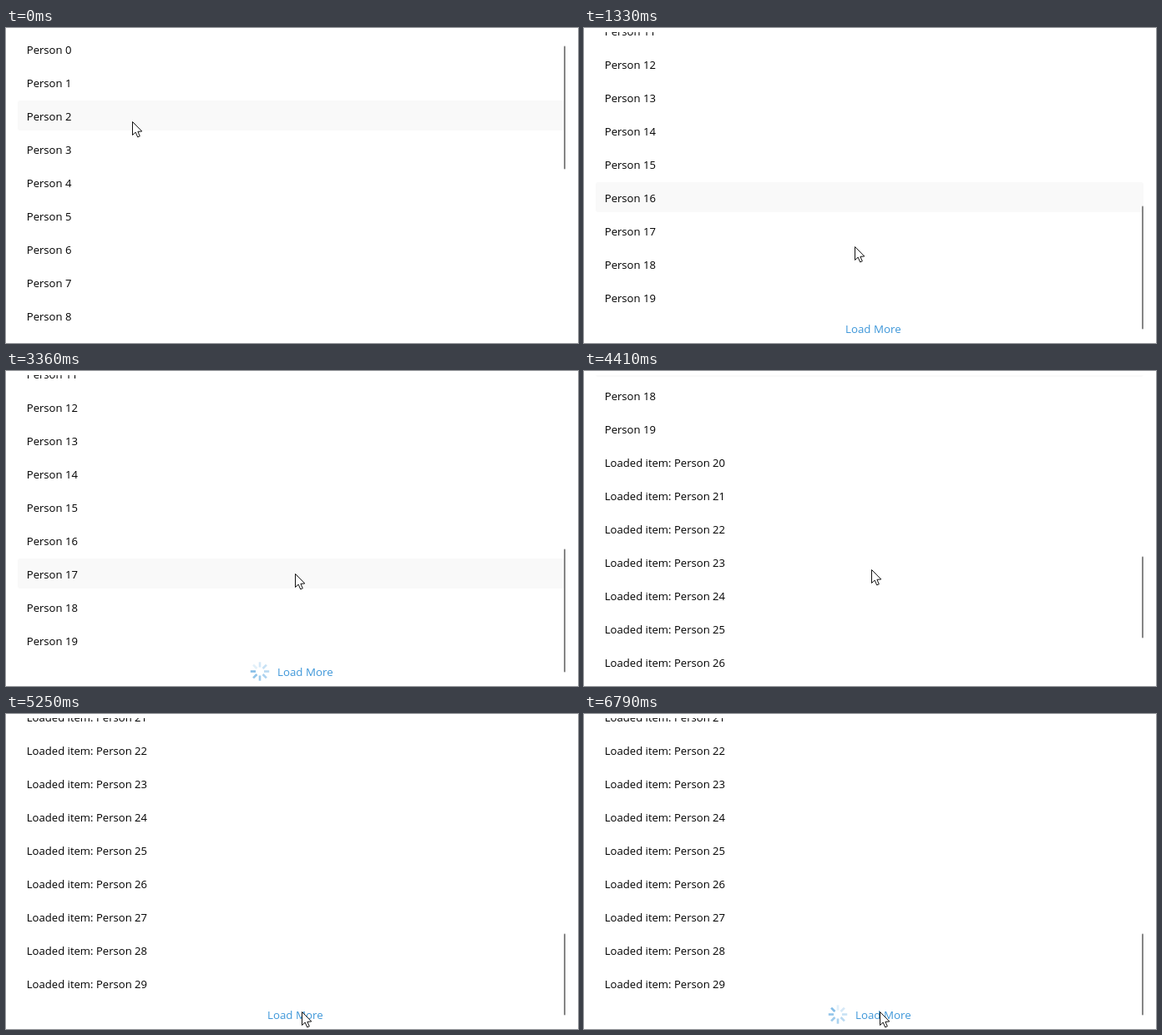
Recreate the animation shown at these times as an HTML page with a canvas. Size 685 px wide and 378 px high, loop 6860 ms.

```html
<!DOCTYPE html>
<html lang="en">
<head>
<meta charset="utf-8">
<title>Load More list</title>
<style>
html, body { margin: 0; width: 100%; height: 100%; overflow: hidden; background: #fff; }
canvas { display: block; }
</style>
</head>
<body>
<canvas id="stage" width="685" height="378"></canvas>
<script>
const ctx = document.getElementById('stage').getContext('2d');
const LOOP = 6860, TICK = 70, ROW = 40, SPIN = 93;
const LOADED = 3920, FIRST_CLICK = 2170, SECOND_CLICK = 5460;
const ACCENT = '#3e97d9';
const FONT = '"Open Sans", "Noto Sans", sans-serif';

const pointerStart = { x: 151, y: 112 };
const pointerMoves = [
  { from: 0, to: 140, x: 149, y: 117 },
  { from: 1120, to: 1330, x: 324, y: 262 },
  { from: 1330, to: 1820, x: 336, y: 359 },
  { from: 2660, to: 3360, x: 346, y: 243 },
  { from: 3360, to: 3500, x: 344, y: 238 },
  { from: 4830, to: 5250, x: 354, y: 357 }
];

const progress = (t, from, to) => Math.max(0, Math.min(1, (t - from) / (to - from)));
const easeOut = (u, power) => 1 - (1 - u) ** power;
const smooth = u => u * u * (3 - 2 * u);

const countAt = t => t < LOADED ? 20 : 30;

function scrollAt(t) {
  return Math.round(462 * easeOut(progress(t, 420, 1050), 2.34)
    + 400 * easeOut(progress(t, 4270, 4760), 3));
}

function pointerAt(t) {
  let { x, y } = pointerStart;
  for (const m of pointerMoves) {
    const u = smooth(progress(t, m.from, m.to));
    x += (m.x - x) * u;
    y += (m.y - y) * u;
  }
  return { x: Math.round(x), y: Math.round(y) };
}

// The highlight trails the pointer, and trails longer while the list scrolls.
function hoverAt(t) {
  const scrolling = scrollAt(t) !== scrollAt(t - TICK);
  const past = t - (scrolling ? 315 : TICK);
  const row = Math.floor((pointerAt(past).y + scrollAt(past) - 7) / ROW);
  return row < countAt(past) ? row : -1;
}

function text(str, x, y, color, size) {
  ctx.font = size + 'px ' + FONT;
  ctx.fillStyle = color;
  ctx.fillText(str, x, y);
}

function pill(x, y, w, h, r, color) {
  ctx.fillStyle = color;
  ctx.beginPath();
  ctx.roundRect(x, y, w, h, r);
  ctx.fill();
}

function drawSpinner(x, y, elapsed) {
  const head = Math.floor(elapsed / SPIN + 0.4) + 1;
  ctx.save();
  ctx.translate(x, y);
  ctx.lineWidth = 2.6;
  ctx.strokeStyle = ACCENT;
  ctx.rotate(head * Math.PI / 4);
  for (let age = 0; age < 8; age++) {
    ctx.globalAlpha = 0.64 - age * 0.07;
    ctx.beginPath();
    ctx.moveTo(0, -5);
    ctx.lineTo(0, -11.2);
    ctx.stroke();
    ctx.rotate(-Math.PI / 4);
  }
  ctx.restore();
}

function drawPointer({ x, y }) {
  ctx.save();
  ctx.translate(x + 0.5, y + 0.5);
  ctx.beginPath();
  [[0, 0], [0, 16], [3.7, 12.6], [6.2, 18.4], [8.8, 17.3], [6.4, 11.8], [11.3, 11.5]]
    .forEach(([px, py]) => ctx.lineTo(px, py));
  ctx.closePath();
  ctx.fillStyle = '#fff';
  ctx.strokeStyle = '#111';
  ctx.fill();
  ctx.stroke();
  ctx.restore();
}

function drawList(t, scroll, count) {
  const hover = hoverAt(t);
  if (hover >= 0) pill(14, hover * ROW + 7 - scroll, 656, 36, 3, '#f9f9f9');
  for (let i = 0; i < count; i++) {
    const label = (i < 20 ? '' : 'Loaded item: ') + 'Person ' + i;
    text(label, 24.8, i * ROW + 31 - scroll, '#000', 13.1);
  }
}

function drawFooter(t, y) {
  const start = t < LOADED ? FIRST_CLICK : SECOND_CLICK;
  const busy = t >= start;
  text('Load More', busy ? 325 : 313, y, ACCENT, 13.3);
  if (busy) drawSpinner(304, y - 5.5, t - start);
}

function drawScrollbar(scroll, count) {
  const height = count === 20 ? 148 : 98;
  const range = count * ROW - 338;
  pill(668, 21.5 + scroll / range * (340 - height), 2, height, 1, '#868686');
}

function draw(t) {
  const scroll = scrollAt(t), count = countAt(t);
  ctx.fillStyle = '#fff';
  ctx.fillRect(0, 0, 685, 378);
  ctx.save();
  ctx.beginPath();
  ctx.rect(0, 5, 685, 373);
  ctx.clip();
  drawList(t, scroll, count);
  drawFooter(t, count * ROW + 28 - scroll);
  ctx.restore();
  drawScrollbar(scroll, count);
  drawPointer(pointerAt(t));
}

const began = performance.now();
function frame() {
  const t = Math.max(0, performance.now() - began) % LOOP;
  draw(Math.floor(t / TICK) * TICK);
  requestAnimationFrame(frame);
}
frame();
</script>
</body>
</html>
```
